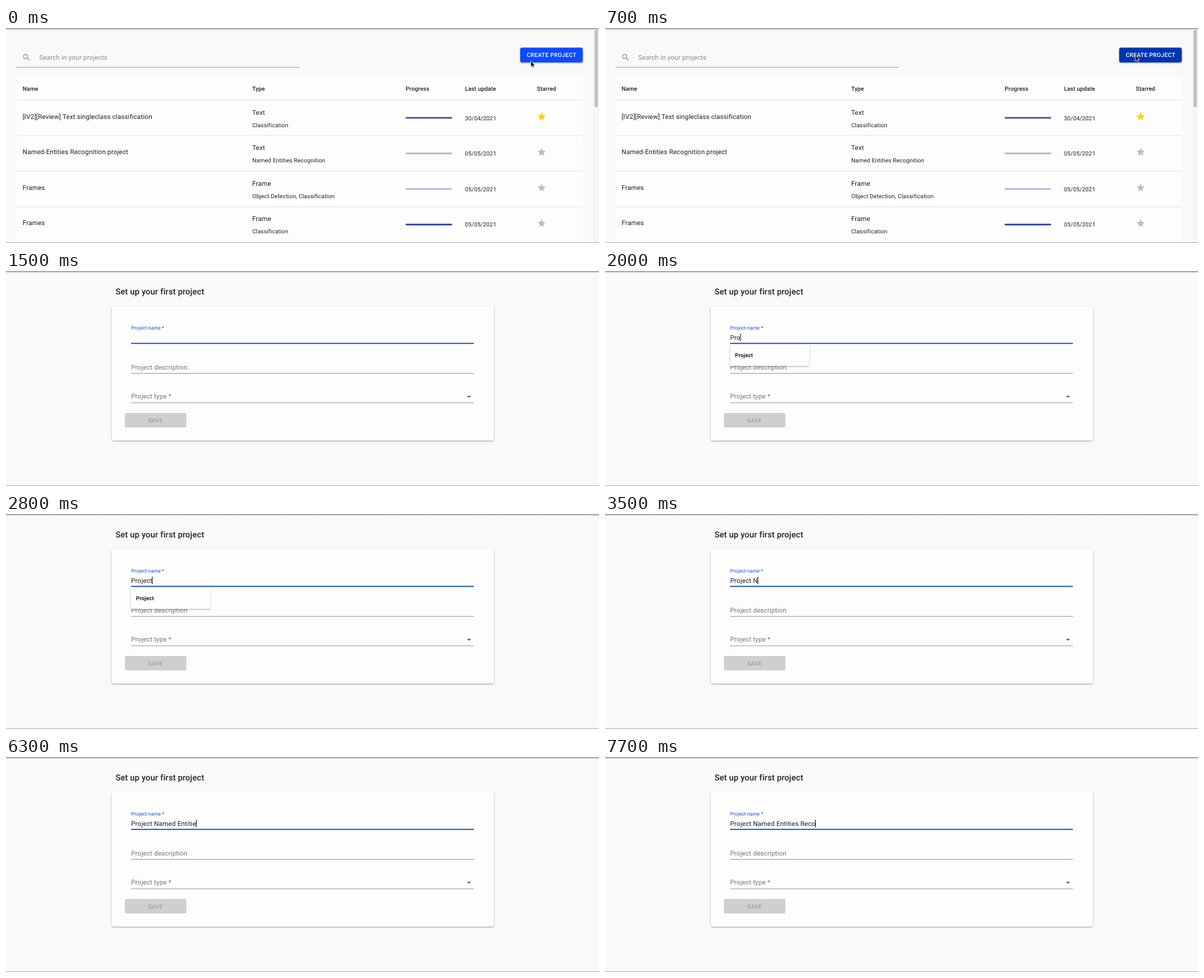
Animation of 858 by 312 pixels, one loop 8 s. Source, as an HTML page:

```html
<!DOCTYPE html>
<html lang="en">
<head>
<meta charset="utf-8">
<title>Create a project</title>
<style>
  html, body { margin: 0; width: 100%; height: 100%; overflow: hidden; background: #f9f9f9; }
  svg { display: block; }
  text {
    font: 9.55px Roboto, Arial, sans-serif; letter-spacing: .00938em;
    fill: #212121; white-space: pre; text-rendering: geometricPrecision;
  }
  .small { font-size: 8.4px; letter-spacing: .01071em; }
  .head { font-size: 8.4px; font-weight: 500; letter-spacing: .01071em; }
  .title { font-size: 12.05px; font-weight: 500; letter-spacing: .0075em; }
  .button { font-size: 8.4px; font-weight: 500; letter-spacing: .02857em; }
  .hint { fill: #757575; }
  .option { font-size: 7.9px; font-weight: 700; }
</style>
</head>
<body>
<svg width="858" height="312" viewBox="0 0 858 312">
  <defs>
    <linearGradient id="bar" x2="0" y2="1">
      <stop stop-color="#8c8c8c"/><stop offset="1" stop-color="#f9f9f9"/>
    </linearGradient>
    <filter id="shadow" x="-10%" y="-20%" width="120%" height="150%">
      <feDropShadow dx="0" dy="1" stdDeviation=".8" flood-opacity=".35"/>
    </filter>
  </defs>
  <rect width="858" height="312" fill="#f9f9f9"/>

  <g id="list">
    <rect x="15" y="71" width="820" height="241" fill="#fdfdfd"/>
    <g fill="none" stroke="#999" stroke-width="1.2">
      <circle cx="28.4" cy="41.4" r="3.1"/><path d="M30.7 43.7l3.5 3.5"/>
    </g>
    <text x="48" y="46" style="fill:#8a8a8a">Search in your projects</text>
    <path d="M15 57h410" stroke="#949494" stroke-width=".8"/>
    <g filter="url(#shadow)"><rect id="create" x="744" y="28.5" width="90.5" height="21.5" rx="2.4"/></g>
    <text class="button" x="753.4" y="42.3" style="fill:#fff">CREATE PROJECT</text>
    <g id="table"></g>
    <rect x="850" y="2" width="8" height="310" fill="#f6f6f6"/>
    <rect x="851.5" y="2" width="5" height="113" rx="2.5" fill="#c1c1c1"/>
  </g>

  <g id="form">
    <text class="title" x="158.4" y="34">Set up your first project</text>
    <rect x="153" y="51" width="553" height="195" rx="3" fill="#fdfdfd" filter="url(#shadow)"/>
    <text id="label" x="181" style="fill:#1a4be0">Project name *</text>
    <text id="value" x="181" y="100"></text>
    <rect id="caret" y="91" width="1" height="11" fill="#222"/>
    <path d="M181 105.5h496M181 148.5h496M181 191.2h496" stroke="#8f8f8f" stroke-width=".8"/>
    <path id="line" stroke="#1757c2" stroke-width="1.5"/>
    <text class="hint" x="181" y="142.6">Project description</text>
    <text class="hint" x="181" y="185.4">Project type *</text>
    <path d="M667 181h6l-3 3z" fill="#666"/>
    <rect x="172" y="206" width="89" height="21" rx="2" fill="#cfcfcf"/>
    <text class="button" x="205.5" y="219.7" style="fill:#a0a0a0">SAVE</text>
    <g id="popup">
      <rect x="181" y="107" width="114.5" height="30.5" rx="1" fill="#fefefe" filter="url(#shadow)"/>
      <text class="option" x="188" y="125.4">Project</text>
    </g>
  </g>

  <rect width="858" height="3" fill="url(#bar)"/>
  <rect y="311" width="858" height="1" fill="#b8b8b8"/>
  <path id="cursor" d="M0 0v8.8l2-1.9 1.4 3.2 1.5-.6-1.4-3.1h2.9z" fill="#000" stroke="#fff" stroke-width=".7"/>
</svg>

<script>
const $ = id => document.getElementById(id);
const LOOP = 8000, STEP = 100;
const FORM_AT = 800, LEFT = 181, MIDDLE = 429;
const TYPED = 'Project Named Entities Reco';
// moment at which each character of TYPED appears
const KEYS = [
  1700, 1800, 2000, 2200, 2300, 2700, 2800, 3100, 3500, 3600, 3700, 3800, 4700, 5100,
  5300, 5400, 5600, 5600, 5800, 6200, 6300, 6500, 6600, 6900, 7100, 7600, 7700
];
const STAR = 'M12 17.27L18.18 21l-1.64-7.03L22 9.24l-7.19-.61L12 2 9.19 8.63 2 9.24l5.46 4.73L5.82 21z';

const HEADS = [[24, 'Name'], [356.3, 'Type'], [578.3, 'Progress'], [664, 'Last update'], [768, 'Starred']];
const ROWS = [
  ['[IV2][Review] Text singleclass classification', 'Text', 'Classification', '30/04/2021', true, true],
  ['Named-Entities Recognition project', 'Text', 'Named Entities Recognition', '05/05/2021', false, false],
  ['Frames', 'Frame', 'Object Detection, Classification', '05/05/2021', false, false],
  ['Frames', 'Frame', 'Classification', '05/05/2021', true, false]
];

const text = (x, y, str, cls = '') => `<text class="${cls}" x="${x}" y="${y}">${str}</text>`;

function row([name, type, task, date, done, starred], i) {
  return `<g transform="translate(0 ${i * 51.6})">
    <path d="M15 104.5h820" stroke="#dedede" stroke-width=".8"/>
    ${text(24, 131.7, name)}${text(356.3, 125.7, type)}
    ${text(356.3, 143.5, task, 'small')}${text(664, 133.5, date, 'small')}
    <path d="M578.3 130.4h67" stroke="${done ? '#3a47a5' : '#b1b5df'}" stroke-width="2.4"/>
    <path d="${STAR}" transform="translate(767.8 121.3) scale(.6)" fill="${starred ? '#ffd000' : '#bdbdbd'}"/>
  </g>`;
}

$('table').innerHTML = HEADS.map(([x, str]) => text(x, 90.8, str, 'head')).join('') + ROWS.map(row).join('');

const between = (t, from, to) => t >= from && t < to;
const show = (id, on) => $(id).style.display = on ? '' : 'none';
const mix = (a, b, p) => a + (b - a) * p;

function drawList(t) {
  const hover = Math.min(t / 300, 1);
  const [r, g, b] = [[8, 6], [76, 52], [255, 178]].map(([from, to]) => Math.round(mix(from, to, hover)));
  $('create').setAttribute('fill', `rgb(${r},${g},${b})`);
  $('cursor').setAttribute('transform', `translate(${mix(759.3, 767.2, hover)} ${mix(48, 39.3, hover)})`);
}

function drawForm(t) {
  const entering = t < FORM_AT + STEP;
  const half = entering ? 221 : 248;
  $('line').setAttribute('d', `M${MIDDLE - half} 105h${half * 2}`);
  $('label').setAttribute('y', entering ? 86 : 84.6);
  $('label').style.fontSize = entering ? '7.4px' : '7.15px';

  $('value').textContent = TYPED.slice(0, KEYS.filter(k => k <= t).length);
  $('caret').setAttribute('x', LEFT + $('value').getComputedTextLength() - .4);
  show('caret', !between(t, 1200, 1700) && !between(t, 4300, 4700));
  show('popup', between(t, 1800, 2900));
}

function frame(now) {
  const t = Math.floor(now % LOOP / STEP) * STEP;
  const onForm = t >= FORM_AT;
  show('list', !onForm);
  show('form', onForm);
  show('cursor', t < 1100);
  drawList(t);
  if (onForm) drawForm(t);
  requestAnimationFrame(frame);
}
frame(0);
</script>
</body>
</html>
```
